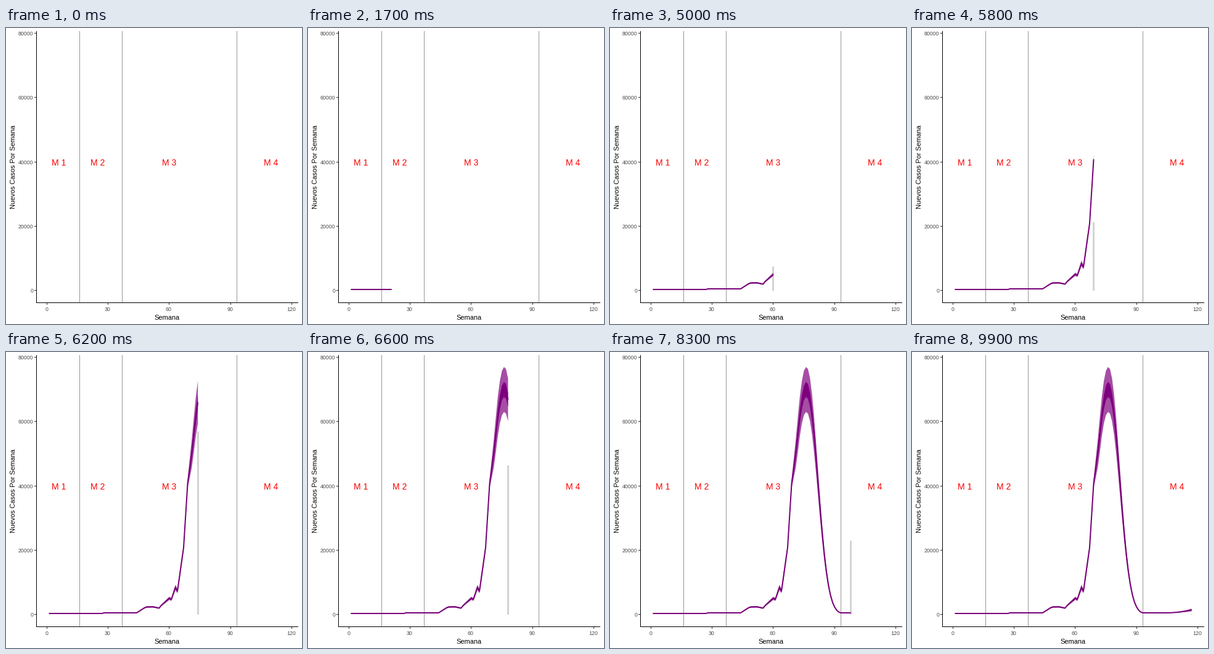
These frames come from a looping animation (480 px wide and 480 px high, 10000 ms). A matplotlib script:

```python
import numpy as np
import matplotlib.pyplot as plt
from matplotlib.animation import FuncAnimation
from matplotlib.patches import Polygon, Rectangle

SIZE, FRAMES, WEEKS = 480, 100, 117
plt.rcParams["font.family"] = "Liberation Sans"


def px(week):
    return 66.2 + 3.31 * week


def py(cases):
    return 425.5 - cases * 417 / 80000


def bump(w, centre, height, rise, fall, power=2):
    d = np.abs(w - centre) / np.where(w < centre, rise, fall)
    return height * np.exp(-d ** power)


weeks = np.arange(1, WEEKS + 1)
late = np.clip((weeks - 104) / 13, 0, 1)

# Model median: flat start, kinked climb, one big bell, slow late growth
climb = [(44, 480), (48.5, 2300), (52, 2350), (55, 1950), (56, 2750),
         (60, 5000), (61, 4650), (63, 8400), (64, 7250), (67, 20700),
         (69, 40800), (71, 50000)]
bell = bump(weeks, 76.2, 70000, 8.5, 7.7, 2.1)
median = np.where(weeks > 71, bell, np.interp(weeks, *zip(*climb)))
median = np.maximum(median, 480) + 900 * late ** 2
median[weeks < 28] = 288

# Relative half-width of the outer band, tight during the steepest climb
spread = .1 - bump(weeks, 68, .08, 2.2, 2.2) + .2 * late

# Reported cases: four overlapping waves
reported = (bump(weeks, 49, 6300, 4, 7) + bump(weeks, 62, 7650, 6, 8)
            + bump(weeks, 75, 58000, 5.5, 6.28) + bump(weeks, 98, 22930, 1.5, 4))

appears = np.round((FRAMES - 1) * (weeks - 1) / (WEEKS - 1))

fig = plt.figure(figsize=(SIZE / 72, SIZE / 72), dpi=72, facecolor="white")
ax = fig.add_axes([0, 0, 1, 1])
ax.set(xlim=(0, SIZE), ylim=(SIZE, 0))
ax.axis("off")


def rule(x, y, color):
    ax.plot(x, y, color=color, lw=1, solid_capstyle="butt", snap=False, zorder=1)


def label(x, y, text, size, color, ha="center", **kw):
    ax.text(x, y, text, size=size, color=color, ha=ha, va="baseline", **kw)


for week in (16, 37, 93):
    x = np.floor(px(week)) + .5
    rule([x, x], [5, 445], "#969696")
rule([49.5, 49.5], [5, 446], "black")
rule([49, 474], [445.5, 445.5], "black")

for week in range(0, 121, 30):
    x = np.floor(px(week)) + .5
    rule([x, x], [446, 449], "#333333")
    label(x - .7, 459, week, 8.8, "#4d4d4d")
for cases in range(0, 80001, 20000):
    y = np.floor(py(cases)) + .5
    rule([46, 49], [y, y], "#333333")
    label(44.3, y + 3.7, cases, 8.8, "#4d4d4d", ha="right")

label(260.7, 473, "Semana", 11, "black")
label(15.5, 225, "Nuevos Casos Por Semana", 11, "black",
      rotation=90, rotation_mode="anchor")
for i, x in enumerate((85.5, 148.5, 264.5, 429.5), 1):
    label(x, 223, f"M {i}", 14, "red")

bar = ax.add_patch(Rectangle((0, 0), 3, 0, fc="#d3d3d3", lw=0, zorder=2))


def ribbon(color, z):
    return ax.add_patch(Polygon([[0, 0]] * 3, fc=color, lw=0, zorder=z))


outer, inner = ribbon("#a64da6", 3), ribbon("#800080", 3.1)
curve, = ax.plot([], [], color="#780078", lw=2, snap=False,
                 solid_capstyle="butt", solid_joinstyle="round", zorder=4)


def band(n, half):
    x, mid, d = px(weeks[:n]), median[:n], half[:n] * median[:n]
    return np.r_[np.c_[x, py(mid + d)], np.c_[x, py(mid - d)][::-1]]


def draw(i):
    n = int(np.sum(appears <= i))
    outer.set_xy(band(n, spread))
    inner.set_xy(band(n, spread / 3))
    curve.set_data(px(weeks[:n]), py(median[:n]))
    top = py(reported[n - 1])
    bar.set_bounds(px(weeks[n - 1]) - 1.5, top, 3, py(0) - top)
    return bar, outer, inner, curve


anim = FuncAnimation(fig, draw, frames=FRAMES, interval=100,
                     repeat=True, repeat_delay=0, blit=False)
plt.show()
```
